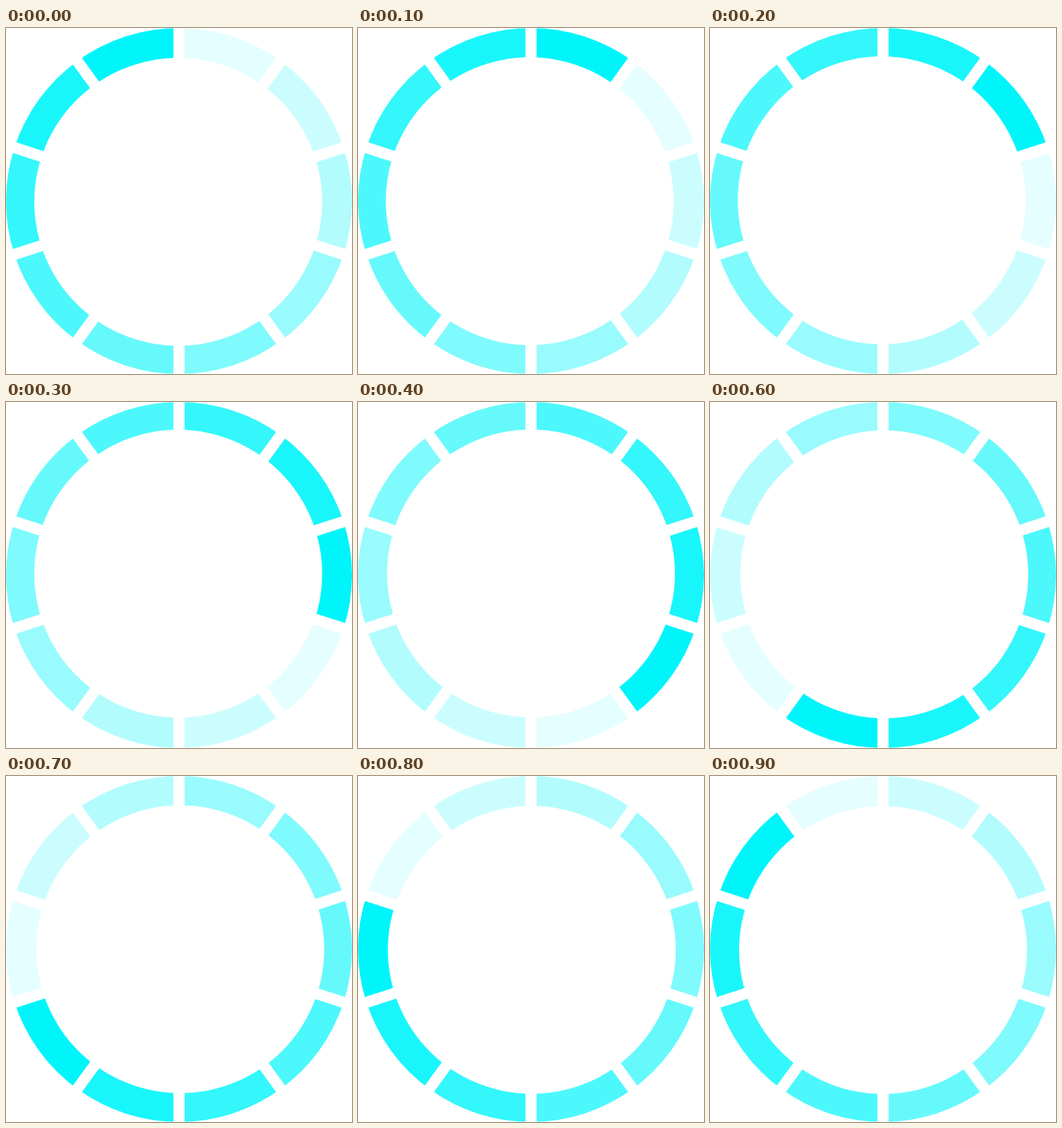
An HTML page with a canvas that plays this animation: 512x512 px, repeating every 1000 ms.

```html
<!DOCTYPE html>
<html>
<head>
<meta charset="utf-8">
<style>
html, body { margin: 0; width: 100%; height: 100%; overflow: hidden; background: #fff; }
canvas { display: block; }
</style>
</head>
<body>
<canvas id="stage" width="512" height="512"></canvas>
<script>
const ctx = document.getElementById('stage').getContext('2d');
const COUNT = 10, STEP_MS = 100, C = 256, R = 256;
const TURN = 2 * Math.PI / COUNT;

function draw(step) {
  ctx.fillStyle = '#fff';
  ctx.fillRect(0, 0, 512, 512);

  // Segments fade from the solid head back to the pale tail.
  ctx.fillStyle = '#00f5fb';
  for (let i = 0; i < COUNT; i++) {
    const start = i * TURN - Math.PI / 2;
    ctx.globalAlpha = ((i - step + COUNT) % COUNT + 1) / COUNT;
    ctx.beginPath();
    ctx.moveTo(C, C);
    ctx.arc(C, C, R, start, start + TURN);
    ctx.fill();
  }
  ctx.globalAlpha = 1;

  // Gaps between segments
  ctx.strokeStyle = '#fff';
  ctx.lineWidth = 16.5;
  ctx.beginPath();
  for (let i = 0; i < COUNT; i++) {
    const a = i * TURN;
    ctx.moveTo(C, C);
    ctx.lineTo(C + 262 * Math.sin(a), C - 262 * Math.cos(a));
  }
  ctx.stroke();

  // The hole wobbles slightly around the centre, one turn per loop.
  const a = 0.7 * Math.PI + step * TURN;
  ctx.fillStyle = '#fff';
  ctx.beginPath();
  ctx.arc(C + 2 * Math.cos(a), 255.7 + 2 * Math.sin(a), 213, 0, 2 * Math.PI);
  ctx.fill();
}

function frame() {
  draw(Math.floor(performance.now() / STEP_MS) % COUNT);
  requestAnimationFrame(frame);
}
frame();
</script>
</body>
</html>
```
